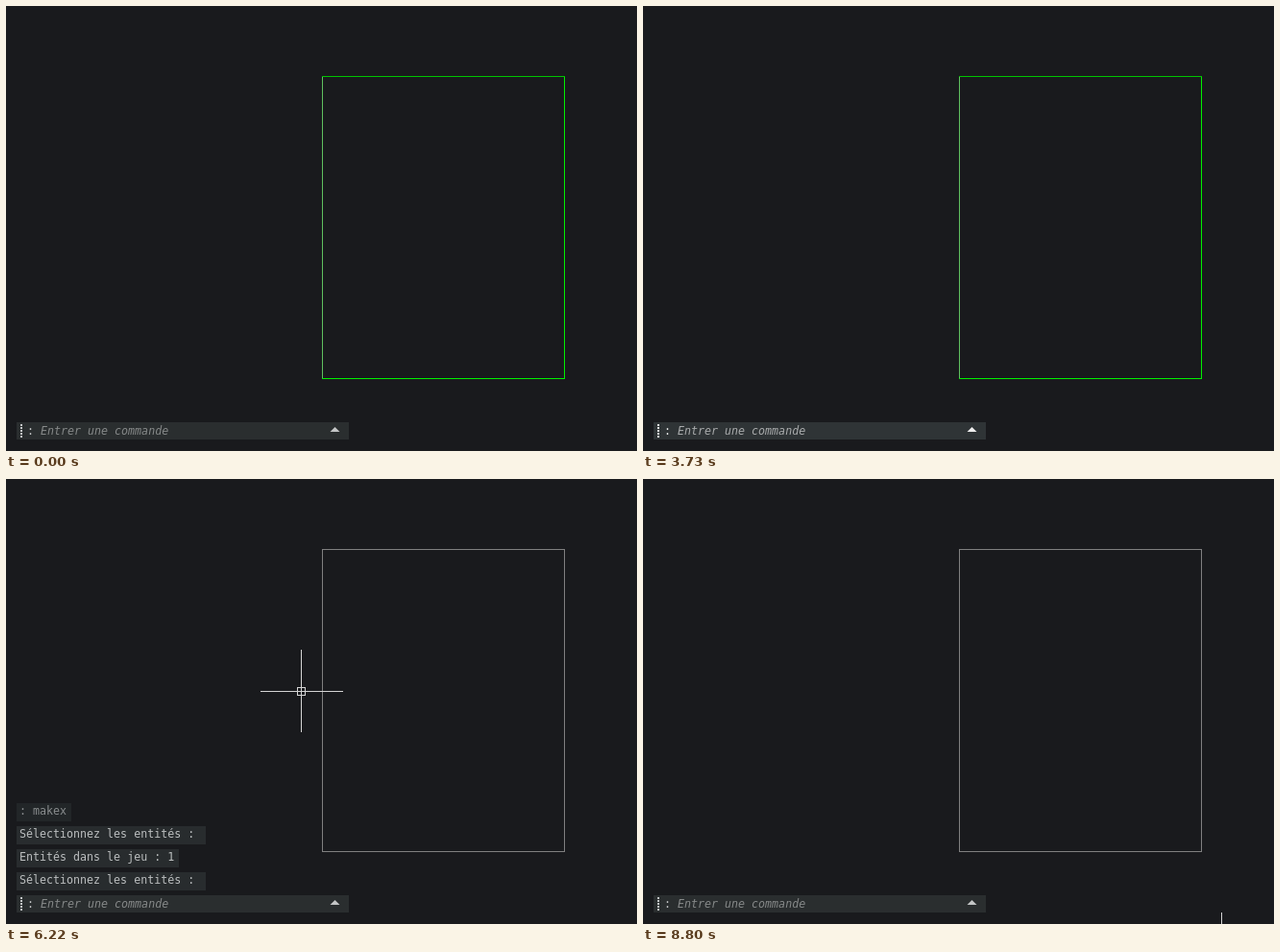
An HTML page with a canvas for the animation above (8870 ms loop, 657 px wide and 464 px high).

```html
<!DOCTYPE html>
<html lang="fr">
<head>
<meta charset="utf-8">
<style>
  html, body { margin: 0; width: 100%; height: 100%; overflow: hidden; background: #191a1d; }
  canvas { display: block; }
</style>
</head>
<body>
<canvas id="stage" width="657" height="464"></canvas>
<script>
const ctx = document.getElementById('stage').getContext('2d');
const LOOP = 8870;
const MONO = '11.65px "DejaVu Sans Mono", monospace';
const UI = '11px Roboto, sans-serif';
const PICK_START = 3960, DONE = 5170;
const PROMPT = 'Sélectionnez les entités : ';

const steady = u => u;
const settle = u => 1 - (1 - u) ** 3;
const clamp = u => Math.min(1, Math.max(0, u));
const between = (t, from, to) => t >= from && t < to;
const point = (x, y) => ({ x, y });

// Pointer glides along a quadratic curve, then rests at its end
const glide = (start, end, ease, a, b, bend = point((a.x + b.x) / 2, (a.y + b.y) / 2)) =>
  ({ start, end, ease, a, b, bend });
const onEdge = point(330, 197), onEdgeAgain = point(328, 200);
const picked = point(422, 387), aside = point(284, 244);
const glides = [
  glide(450, 1210, settle, point(330, 508), onEdge, point(186, 300)),
  glide(2305, 2720, steady, onEdge, point(702, 340), point(272, 250)),
  glide(PICK_START, 4540, settle, point(569, 430), picked),
  glide(DONE, 5920, settle, picked, aside),
  glide(6110, 6610, settle, aside, onEdgeAgain),
  glide(8000, 8280, steady, onEdgeAgain, point(540, 510)),
  glide(8450, 8530, steady, point(589, 508), point(602, 495))
];

// Command history, with the time span over which a line fades out
const history = [
  { at: 3750, value: 'Annuler' },
  { at: 3780, value: 'Annuler' },
  { at: 3810, value: ': (load"makex")C:MAKEX' },
  { at: 3870, value: ': makex', fade: 5500, gone: 7700 },
  { at: 4850, value: PROMPT, fade: 7000, gone: 8800 },
  { at: 4880, value: 'Entités dans le jeu : 1', fade: 7000, gone: 8800 },
  { at: DONE, value: PROMPT, fade: 8000, gone: 8730 }
];

function pointerAt(t) {
  const move = glides.filter(g => t >= g.start).pop();
  if (!move) return null;
  const { a, b, bend } = move;
  const u = move.ease(clamp((t - move.start) / (move.end - move.start)));
  const along = axis => Math.round(
    a[axis] * (1 - u) ** 2 + 2 * bend[axis] * u * (1 - u) + b[axis] * u ** 2);
  return point(along('x'), along('y'));
}

function box(color, x, y, w, h) {
  ctx.fillStyle = color;
  ctx.fillRect(x, y, w, h);
}

function frame(color, x, y, w, h) {
  ctx.strokeStyle = color;
  ctx.lineWidth = 1;
  ctx.strokeRect(x + .5, y + .5, w - 1, h - 1);
}

function text(value, x, y, color, font) {
  ctx.font = font;
  ctx.fillStyle = color;
  ctx.fillText(value, x, y);
}

function drawOutline(t, highlighted) {
  if (highlighted) {
    frame('#0a98c8', 329, 73, 253, 316);
    frame('#0a98c8', 330, 74, 251, 315);
  } else if (t >= DONE) {
    frame('#808080', 329, 73, 253, 316);
  } else {
    frame('#00f000', 329, 73, 253, 316);
    box('#00c400', 329, 73, 253, 1);
    box('#60c060', 329, 74, 1, 314);
  }
}

function drawHistory(t) {
  const lines = history.filter(line => t >= line.at).slice(-4);
  lines.forEach(({ value, fade, gone }, i) => {
    const y = 434 - 24 * (lines.length - i);
    ctx.globalAlpha = fade ? clamp((gone - t) / (gone - fade)) : 1;
    box('#282c2e', 11, y, 8 + value.length * 7, 19);
    text(value, 14, y + 12, '#bcbfc0', MONO);
  });
  ctx.globalAlpha = 1;
}

function drawBar(t) {
  const active = between(t, 3730, DONE);
  const bright = active ? '#eeeeee' : '#c4c6c7';
  box(active ? '#2f3436' : '#2a2e2f', 11, 434, 346, 18);
  for (let y = 436; y < 451; y += 3) box(bright, 15, y, 2, 2);
  if (between(t, 3870, DONE)) {
    text(PROMPT, 22, 447, '#e8e8e8', MONO);
  } else {
    text(':', 22, 447, bright, MONO);
    text('Entrer une commande', 36, 447, active ? '#a9abac' : '#868989', 'italic ' + MONO);
  }
  ctx.fillStyle = bright;
  ctx.beginPath();
  ctx.moveTo(337.5, 444);
  ctx.lineTo(342.5, 439);
  ctx.lineTo(347.5, 444);
  ctx.fill();
}

function drawPointer(t, highlighted) {
  const pointer = pointerAt(t);
  if (!pointer) return;
  const { x, y } = pointer;
  const color = '#d4d4d4';
  if (!between(t, PICK_START, DONE)) {
    box(color, x - 42, y, 86, 1);
    box(highlighted && x >= 328 ? '#e08a90' : color, x, y - 43, 1, 86);
  }
  frame(color, x - 4, y - 4, 9, 9);
}

function drawPanel(x, y, layer, swatch) {
  const white = '#ffffff', grey = '#7c7f7c';
  box('#2b2e34', x, y, 151, 95);
  box('#191a1f', x, y, 151, 18);
  for (let row = 36; row <= 90; row += 18) box('#23262b', x, y + row, 151, 1);
  box('#23262b', x + 55, y + 18, 1, 77);
  frame('#6a6c70', x, y, 151, 95);
  text('Polyligne', x + 2, y + 14, white, UI);
  ctx.strokeStyle = '#e0e0e0';
  ctx.beginPath();
  ctx.moveTo(x + 140, y + 6);
  ctx.lineTo(x + 145, y + 11);
  ctx.moveTo(x + 145, y + 6);
  ctx.lineTo(x + 140, y + 11);
  ctx.stroke();
  ['Couleur', 'Calque', 'Longueur', 'Aire'].forEach((label, i) =>
    text(label, x + 5, y + 31 + 18 * i, white, UI));
  box(swatch, x + 62, y + 20, 13, 13);
  frame('#000000', x + 62, y + 20, 13, 13);
  text('ParCalque', x + 80, y + 30, white, UI);
  text(layer, x + 59, y + 49, white, UI);
  text('36.0000 m', x + 59, y + 67, grey, UI);
  text('80.0000 m²', x + 59, y + 85, grey, UI);
}

function draw(now) {
  const t = now % LOOP;
  const highlighted = between(t, 1190, 2360) || between(t, 4850, DONE) || between(t, 6580, 8030);
  box('#191a1d', 0, 0, 657, 464);
  drawOutline(t, highlighted);
  drawHistory(t);
  drawBar(t);
  drawPointer(t, highlighted);
  if (between(t, 1390, 2350)) drawPanel(340, 162, 'E-BAT-PRINCIPAL', '#00ff00');
  if (between(t, 6790, 8000)) drawPanel(338, 165, 'X-BAT-PRINCIPAL', '#808080');
}

const start = performance.now();
function tick() {
  draw(performance.now() - start);
  requestAnimationFrame(tick);
}
tick();
</script>
</body>
</html>
```
